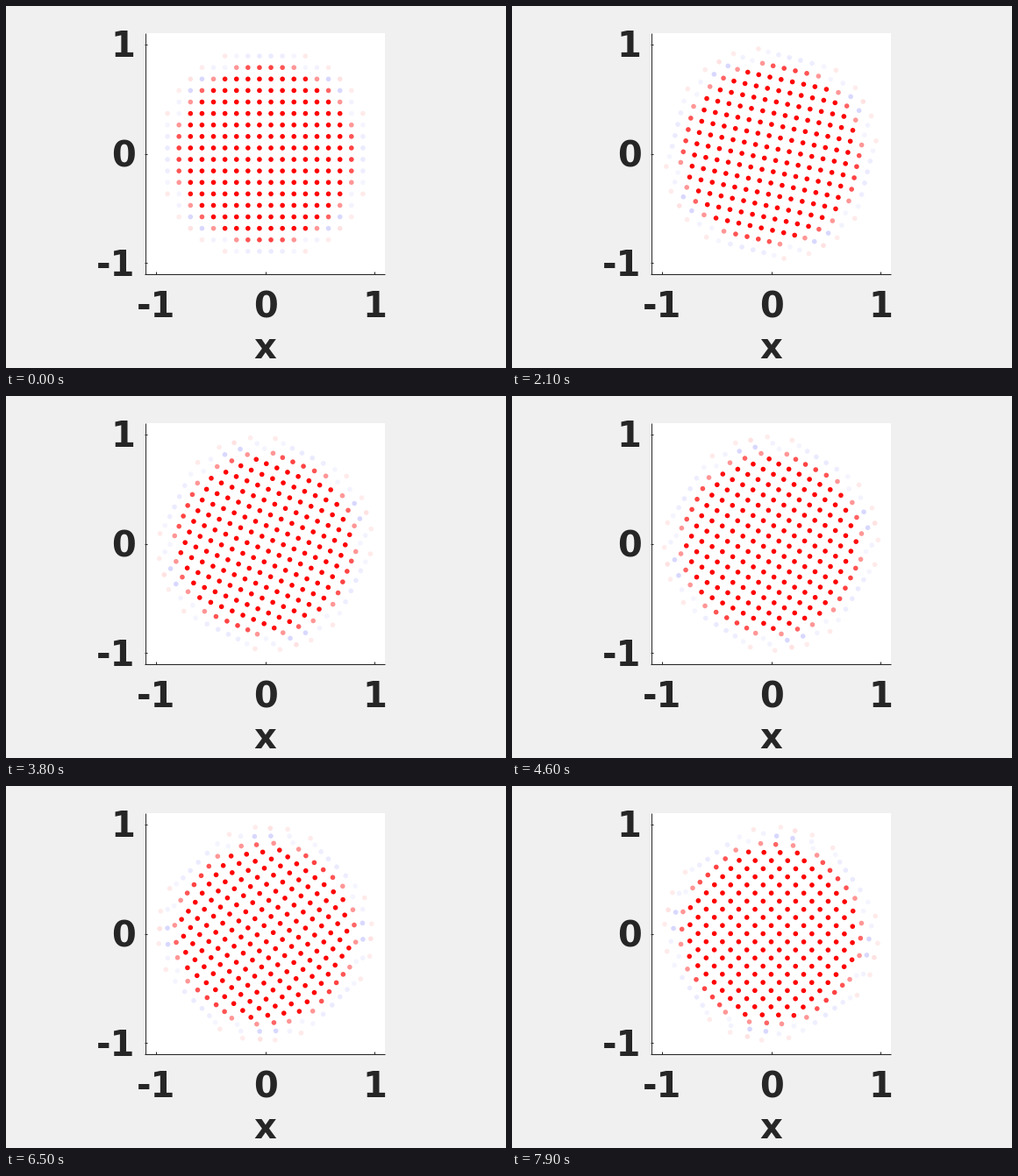
A matplotlib script for the animation above (8000 ms loop, 570 px wide and 413 px high).

```python
import numpy as np
import matplotlib.pyplot as plt
from matplotlib.animation import FuncAnimation
from matplotlib.patches import Rectangle

W, H, DPI = 570, 413, 100
FRAMES, STEP = 80, 100            # frame count, ms per frame
CX, CY, UNIT = 295.5, 168.5, 124.5
INK = "#262626"

# Colours at the rim of the disk, keyed by lattice position in 19ths
RIM = {
    (7, 13): "#ff1010", (1, 15): "#ff4343", (3, 15): "#ff5555",
    (11, 11): "#ff6464", (5, 15): "#ff9696", (9, 13): "#ff9696",
    (7, 15): "#f5f5ff", (11, 13): "#d8d8ff", (1, 17): "#ebebff",
    (3, 17): "#eeeeff", (5, 17): "#f5f5ff", (9, 15): "#f3f3ff",
    (7, 17): "#ffeaea", (13, 13): "#ffe2e2", (11, 15): "#ffecec",
}


def px(n):
    return n * 72 / DPI


def spin(r):
    """Clockwise rate in degrees per second: rigid core, faster rim."""
    return 5.71 + 9.2 * 0.03 * np.logaddexp(0, (r - 0.79) / 0.03)


# Square lattice clipped to the unit disk
odd = np.arange(-19, 20, 2)
gx, gy = (g.ravel() for g in np.meshgrid(odd, odd))
inside = np.hypot(gx, gy) < 19
gx, gy = gx[inside], gy[inside]
radius = np.hypot(gx, gy) / 19
start = np.arctan2(gy, gx)
rate = np.radians(spin(radius))
colors = [RIM.get(tuple(sorted((abs(int(a)), abs(int(b))))), "#ff0000")
          for a, b in zip(gx, gy)]


def place(t):
    ang = start - rate * t
    return np.column_stack((CX + UNIT * radius * np.cos(ang),
                            CY - UNIT * radius * np.sin(ang)))


fig = plt.figure(figsize=(W / DPI, H / DPI), dpi=DPI, facecolor="#f0f0f0")
ax = fig.add_axes([0, 0, 1, 1])
ax.set_xlim(0, W)
ax.set_ylim(H, 0)
ax.axis("off")

ax.add_patch(Rectangle((158, 31), 274, 274, color="white", lw=0))


def line(xs, ys):
    ax.plot(xs, ys, color=INK, lw=px(1), solid_capstyle="butt", zorder=2)


def label(x, y, s, ha):
    ax.text(x, y, s, ha=ha, va="baseline", color=INK, family="DejaVu Sans",
            weight="bold", size=px(40))


line([158.5, 158.5], [31, 306])
line([158, 432], [305.5, 305.5])
for v in (-1, 0, 1):
    x, y = CX + UNIT * v, CY - UNIT * v
    line([x, x], [303, 306])
    line([158, 161], [y, y])
    label(x, 355, str(v), "center")
    label(147.5, y + 14.5, str(v), "right")
label(CX, 402, "x", "center")

dots = ax.scatter(*place(0).T, s=px(5.6) ** 2, c=colors, linewidths=0, zorder=3)


def update(i):
    dots.set_offsets(place(i * STEP / 1000))
    return (dots,)


anim = FuncAnimation(fig, update, frames=FRAMES, interval=STEP,
                     repeat=True, repeat_delay=0)
plt.show()
```
